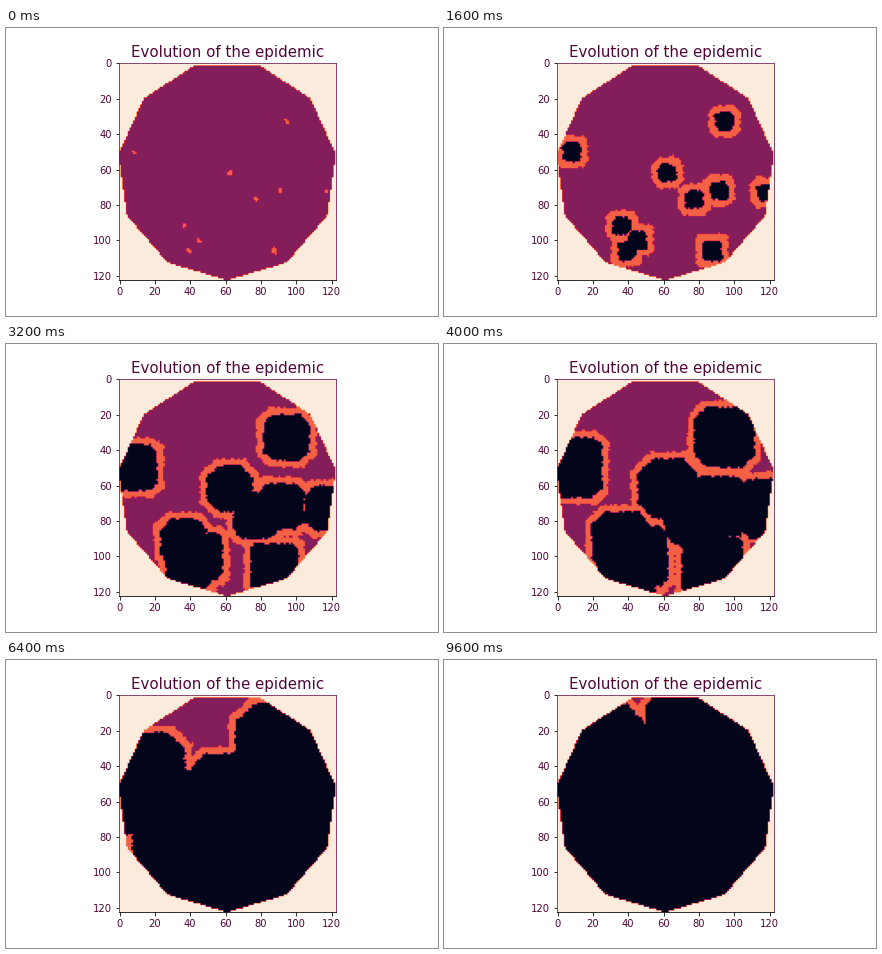
Animation, 432 px wide and 288 px high, one loop 9800 ms. Source, as a matplotlib script:

```python
import numpy as np
import matplotlib.pyplot as plt
from matplotlib.animation import FuncAnimation
from matplotlib.colors import LinearSegmentedColormap

N = 123                 # grid cells per side
FRAMES, INTERVAL = 49, 200
SICK_TIME = 3.9         # frames a cell stays infected
REMOVED, HEALTHY, SICK, OUTSIDE = range(4)
INK, EDGE = "#500638", "#701f57"

# x, y, squareness of the spread, delay
SEEDS = [
    (94, 33, 1.6, 0), (8, 50, 1.69, 0), (62, 62, 1.49, 0),
    (91, 72, 1.62, 0), (77, 77, 1.62, 0), (117, 73, 1.55, 0.4),
    (36, 92, 1.55, 0), (45, 100, 1.75, 0), (39, 106, 1.7, 0),
    (87, 106, 1.78, -0.3),
]

CMAP = LinearSegmentedColormap.from_list("epidemic", [
    (0, "#03051a"), (1 / 7, "#35193e"), (2 / 7, "#701f57"),
    (1 / 3, "#841e5a"), (3 / 7, "#ad1759"), (4 / 7, "#e13342"),
    (2 / 3, "#f26144"), (5 / 7, "#f37651"), (6 / 7, "#f6b48f"),
    (1, "#faebdd")])

yy, xx = np.mgrid[:N, :N]


def polygon_mask(sides=11, center=60.5, apothem=59.49):
    """Cells inside a regular polygon with one corner at the bottom."""
    mask = np.ones((N, N), bool)
    for k in range(sides):
        a = (k + 0.5) * 2 * np.pi / sides
        mask &= ((xx - center) * np.sin(a)
                 + (yy - center) * np.cos(a)) <= apothem
    return mask


def arrival_times():
    """Frame at which the infection reaches each cell."""
    rng = np.random.default_rng(4)
    noise = rng.uniform(-1.2, 1.2, (N, N))
    noise = (noise + np.roll(noise, 1, 0)) / 2
    noise = (noise + np.roll(noise, 1, 1)) / 2
    times = np.full((N, N), np.inf)
    for x, y, squareness, delay in SEEDS:
        dx, dy = abs(xx - x), abs(yy - y)
        reach = np.maximum(np.maximum(dx, dy), (dx + dy) / squareness)
        times = np.minimum(times, 1.015 * reach + delay)
    times = np.maximum(times - 1.2 + noise, 0)
    for x, y, *_ in SEEDS:
        times[y, x] = 0
    return times


inside = polygon_mask()
arrival = arrival_times()


def state(t):
    grid = np.full((N, N), float(OUTSIDE))
    grid[inside] = HEALTHY
    grid[inside & (arrival <= t)] = SICK
    grid[inside & (arrival + SICK_TIME <= t)] = REMOVED
    return grid


plt.rcParams["font.family"] = "DejaVu Sans"
fig, ax = plt.subplots(figsize=(6, 4), dpi=72)
fig.subplots_adjust(left=0.125, right=0.9, bottom=0.125, top=0.88)
image = ax.imshow(state(0), cmap=CMAP, vmin=0, vmax=3,
                  interpolation="hanning")
ax.set_title("Evolution of the epidemic", fontsize=15, color=INK)
ax.set_xticks(range(0, N, 20))
ax.set_yticks(range(0, N, 20))
ax.tick_params(labelsize=10, labelcolor=INK)
ax.spines[["top", "left", "right"]].set_color(EDGE)


def update(t):
    image.set_data(state(t))
    return [image]


anim = FuncAnimation(fig, update, frames=FRAMES, interval=INTERVAL,
                     repeat=True, repeat_delay=0)
plt.show()
```
